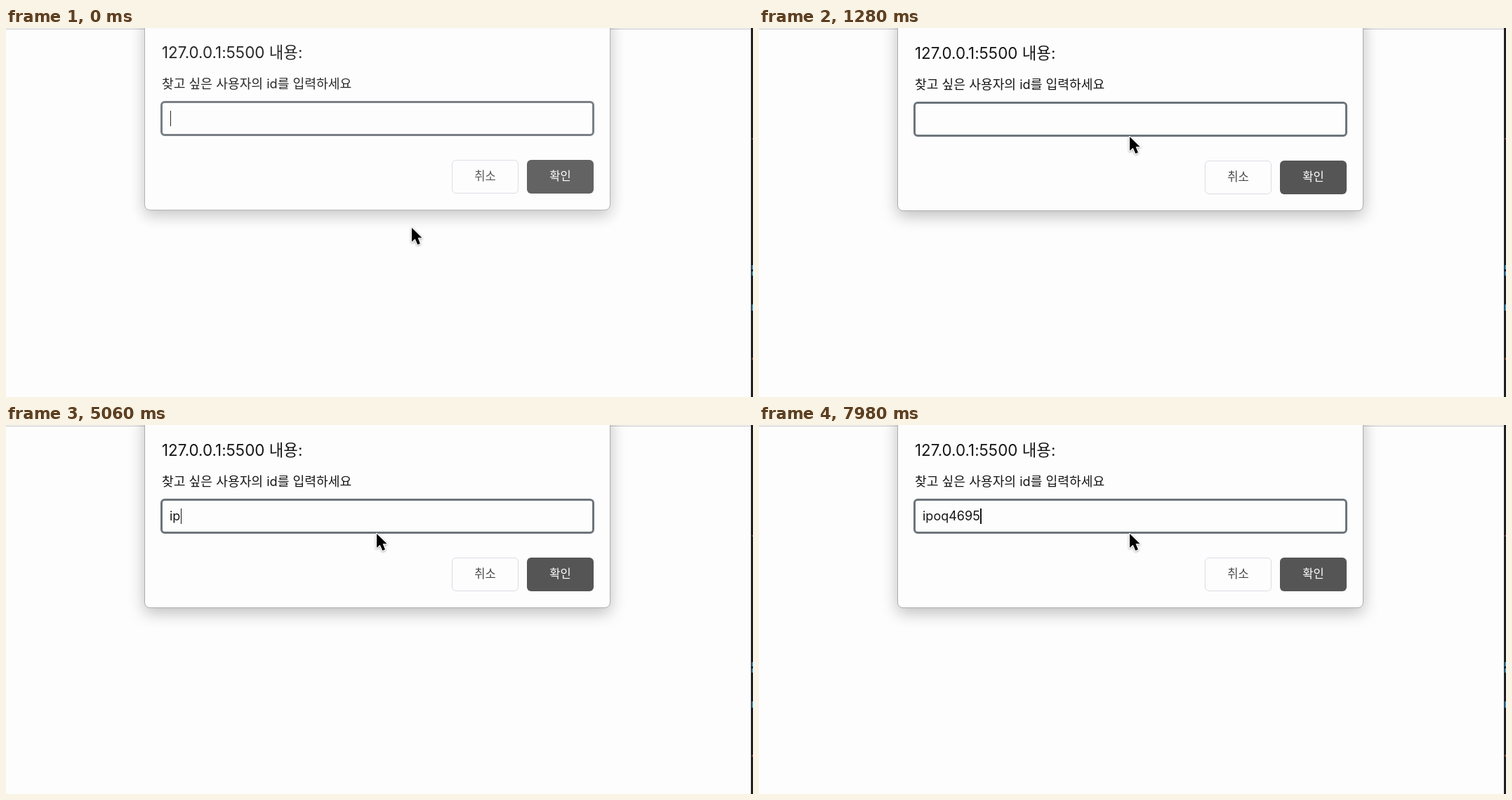
Animation, 1064 px wide and 526 px high, one loop 8000 ms. Source, as an HTML page:

```html
<!DOCTYPE html>
<html lang="ko">
<head>
<meta charset="utf-8">
<title>Prompt dialog</title>
<style>
  html, body { margin: 0; width: 100%; height: 100%; overflow: hidden; }
  body {
    position: relative;
    background: #fdfdfd;
    color: #161618;
    font-family: Inter, "Noto Sans CJK KR", "Noto Sans CJK", sans-serif;
  }
  body *, .edge::before { position: absolute; box-sizing: border-box; white-space: pre; }

  .rule { left: 0; top: 1px; width: 1061px; height: 1px; background: #c4c4c4; }

  /* sliver of the dark window behind the page */
  .edge { left: 1061px; top: 0; width: 3px; height: 526px; background: #1d1f22; }
  .edge i { left: 1px; width: 2px; }
  .blue { background: #3f86ac; }
  .red { background: #7d4438; }

  .dialog {
    left: 197px; top: -20px; width: 664px; height: 281px;
    background: #fdfdfd;
    border: 1px solid #adadb0;
    border-radius: 8px;
    box-shadow: 0 7px 22px rgba(0, 0, 0, .25);
    animation: settle 8s linear infinite;
  }
  @keyframes settle {
    0% { opacity: .92; transform: translateY(-1px); }
    .7%, 100% { opacity: 1; transform: none; }
  }
  .title { left: 24px; top: 39px; font-size: 22.4px; line-height: 32px; }
  .label { left: 24px; top: 86px; font-size: 18.2px; line-height: 26px; }
  .field {
    left: 22px; top: 124px; width: 618px; height: 50px;
    border: 3px solid #6d747b;
    border-radius: 6px;
    font-size: 18px; line-height: 44px;
  }
  .value { left: 10px; top: 0; }
  .caret {
    position: relative; display: inline-block;
    width: 1.5px; height: 22px; margin-left: .5px;
    vertical-align: -5px;
    background: #161618;
  }
  #typed { position: static; }
  .button {
    top: 208px; width: 95px; height: 48px;
    border-radius: 6px;
    font-size: 16.6px; font-weight: 500; line-height: 46px; text-align: center;
  }
  .cancel { left: 437px; border: 1px solid #dadde4; color: #4a4a4c; line-height: 44px; }
  .ok { left: 544px; background: #555; color: #fff; }

  .pointer {
    left: 0; top: 0; width: 24px; height: 32px;
    overflow: visible;
    filter: drop-shadow(0 1px 1.5px rgba(0, 0, 0, .35));
    animation: travel 8s infinite;
  }
  @keyframes travel {
    0% { transform: translate(578px, 285px); animation-timing-function: ease-out; }
    6.5%, 10.5% { transform: translate(553px, 198px); animation-timing-function: ease-in-out; }
    15.5%, 100% { transform: translate(528px, 155px); }
  }
</style>
</head>
<body>
  <div class="rule"></div>
  <div class="edge">
    <i class="red" style="top:157px;height:2px"></i>
    <i class="blue" style="top:338px;height:6px"></i>
    <i class="blue" style="top:347px;height:6px"></i>
    <i class="blue" style="top:394px;height:9px"></i>
    <i class="red" style="top:470px;height:3px"></i>
  </div>

  <div class="dialog">
    <div class="title">127.0.0.1:5500 내용:</div>
    <div class="label">찾고 싶은 사용자의 id를 입력하세요</div>
    <div class="field"><div class="value"><span id="typed"></span><span class="caret" id="caret"></span></div></div>
    <div class="button cancel">취소</div>
    <div class="button ok">확인</div>
  </div>

  <svg class="pointer" viewBox="0 0 24 32">
    <path d="M0 0V20L4.7 15.7L8.3 24L12 22.4L8.6 14.3H14.6Z"
      fill="#000" stroke="#fff" stroke-width="2.4" stroke-linejoin="round" paint-order="stroke"/>
  </svg>

<script>
  const LOOP = 8000, BLINK = 500;
  const FIRST_BLINK = -460;   // caret phase before any key is pressed
  const WORD = "ipoq4695";
  const KEYS = [4640, 4900, 5740, 6240, 6900, 7200, 7480, 7760];
  const typed = document.getElementById("typed");
  const caret = document.getElementById("caret");
  const start = performance.now();

  function draw(now) {
    const t = Math.max(0, now - start) % LOOP;
    const count = KEYS.filter(key => key <= t).length;
    const since = t - (count ? KEYS[count - 1] : FIRST_BLINK);
    const text = WORD.slice(0, count);
    if (typed.textContent !== text) typed.textContent = text;
    caret.style.opacity = Math.floor(since / BLINK) % 2 ? 0 : 1;
    requestAnimationFrame(draw);
  }
  draw(start);
</script>
</body>
</html>
```
